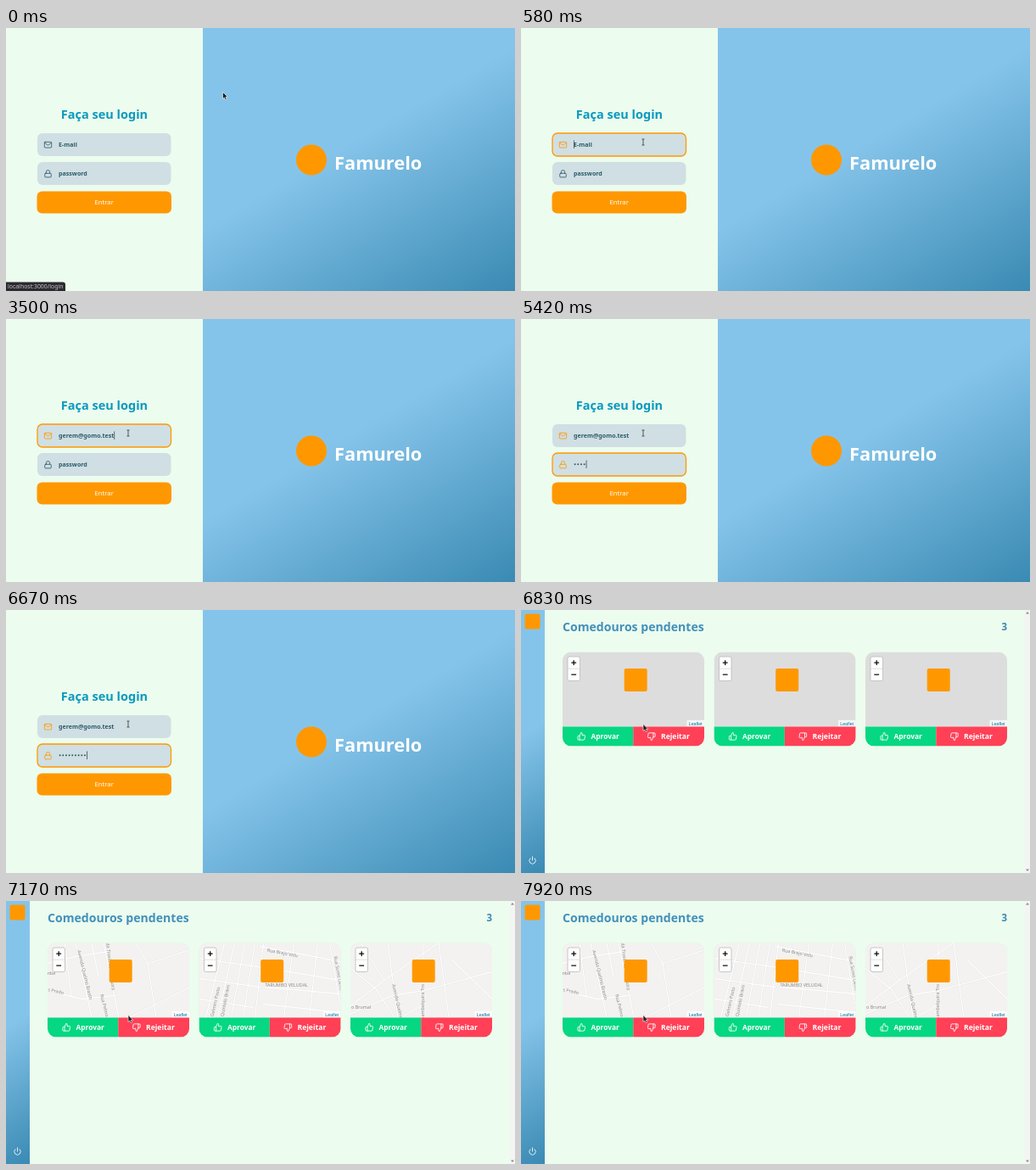
Write an HTML page that moves like this. It is 600 by 310 pixels and loops after 8 s.

```html
<!DOCTYPE html>
<html lang="pt-BR">
<head>
<meta charset="utf-8">
<title>Login</title>
<style>
  html, body { margin: 0; width: 100%; height: 100%; overflow: hidden; background: #ecfcee; }
  .stage { position: relative; width: 600px; height: 310px; overflow: hidden; }
  .blue { position: absolute; top: 0; height: 310px; background: linear-gradient(329.54deg, #3a8ab3 0%, #85c4ea 55%); }
  svg { position: absolute; left: 0; top: 0; font-family: 'Noto Sans', 'Open Sans', sans-serif; }
  .bold { font-weight: 700; }
  .icon { fill: none; stroke-width: 2; stroke-linecap: round; stroke-linejoin: round; }
  .road { fill: none; stroke-linecap: round; }
  .label { font-size: 5.4px; fill: #8b8b8b; }
</style>
</head>
<body>
<div class="stage">
  <div class="blue" id="panel"></div>
  <svg id="scene" width="600" height="310" viewBox="0 0 600 310"></svg>
</div>
<script>
const LOOP = 8000, DASHBOARD_AT = 6830, FOCUS_EMAIL = 580, FOCUS_PASSWORD = 3580;
const EMAIL = 'gerem@gomo.test';
const EMAIL_KEYS = [1080, 1170, 1420, 1580, 1750, 1920, 2170, 2250, 2420, 2750, 2750, 3000, 3080, 3170, 3330];
const PASSWORD_KEYS = [4580, 4920, 5250, 5420, 5580, 5750, 5920, 6170, 6330];
const ORANGE = '#ff9800', INK = '#2b5b6a';

const ICONS = {
  mail: '<rect x="2" y="4" width="20" height="16" rx="2"/><path d="M22 6l-10 7L2 6"/>',
  lock: '<rect x="3" y="11" width="18" height="11" rx="2"/><path d="M7 11V7a5 5 0 0 1 10 0v4"/>',
  power: '<path d="M18.4 6.6a9 9 0 1 1-12.8 0M12 2v10"/>',
  thumb: '<path d="M14 9V5a3 3 0 0 0-3-3l-4 9v11h11.3a2 2 0 0 0 2-1.7l1.4-9a2 2 0 0 0-2-2.3zM7 22H4a2 2 0 0 1-2-2v-7a2 2 0 0 1 2-2h3"/>'
};

const icon = (name, x, y, color, size = 10, turn = 0, id = '') =>
  `<g class="icon" id="${id}" stroke="${color}" transform="translate(${x} ${y}) scale(${size / 24}) rotate(${turn} 12 12)">${ICONS[name]}</g>`;

const text = (string, x, y, size, color, extra = '') =>
  `<text x="${x}" y="${y}" font-size="${size}" fill="${color}" ${extra}>${string}</text>`;

const box = (x, y, w, h, fill, extra = '') =>
  `<rect x="${x}" y="${y}" width="${w}" height="${h}" fill="${fill}" ${extra}/>`;

const field = (id, y, iconName) =>
  box(37, y, 157.5, 27, '#d0dfe3', `rx="6" id="${id}Box" stroke-width="1.3"`) +
  icon(iconName, 44.5, y + 8.7, INK, 10, 0, id + 'Icon') +
  text('', 62, y + 16.2, 7.1, INK, `class="bold" id="${id}Text"`);

const loginPage =
  text('Faça seu login', 116, 107, 14.5, '#0c99c0', 'class="bold" text-anchor="middle"') +
  field('email', 124, 'mail') + field('password', 158, 'lock') +
  '<g id="dots"></g>' + box(62, 133, .7, 9.5, '#333', 'id="caret"') +
  box(36.5, 192.5, 158.5, 26, ORANGE, 'rx="6"') +
  text('Entrar', 115.7, 208.2, 7.7, '#fff', 'text-anchor="middle"') +
  `<circle cx="360" cy="155.5" r="18" fill="${ORANGE}"/>` +
  text('Famurelo', 387, 167, 21.8, '#fff', 'class="bold"') +
  '<g id="status"><path d="M0 299.5H67a3 3 0 0 1 3 3V310H0Z" fill="#2b2a2f"/>' +
  text('localhost:3000/login', 2, 307.3, 6.9, '#c4c6c8') + '</g>';

// Roads and [name, x, y, angle] labels, relative to each card's map
const MAPS = [
  {
    roads: 'M33 0L52 88M66 0L76 48L84 88M52 0L60 40M0 24L33 16L72 10M0 56L40 66L78 62M20 0L28 62M96 88L167 52M104 0L118 24L167 8M118 24L128 88',
    labels: [['Avenida Quelmo Brasto', 35, 9, 76], ['da Trovia Sambelquira', 69, 0, 83], ['Rua Pelmo Zas', 62, 61, 76],
             ['os Prado', -3, 56, 12], ['mbe', -2, 37, 0]]
  },
  {
    roads: 'M8 88L30 0M22 88L42 0M38 88L54 0M52 88L66 0M66 88L76 0M0 18L70 28L167 44M0 42L72 52M0 66L64 76M72 4L167 22M78 52L167 60M100 88L112 0M130 88L140 0M154 0L166 72M76 72L167 82',
    labels: [['Rua Brejo Velu', 80, 10, 11], ['Rua Sumo Delva', 159, 16, 80], ['TARUMBO VELUDAL', 78, 51.5, 0],
             ['Gelmiro Pasto', 17, 87, -77], ['Quintelo Bravo', 29, 87, -79]]
  },
  {
    roads: 'M0 74L40 44L92 8L104 0M0 30L30 54L52 88M44 0L56 88M86 0L86 88M0 84L50 62L86 56L167 34M104 0L116 88M120 20L167 66M12 0L40 44M60 88L86 72',
    labels: [['Avenida Quelmo Brasto', 49, 49, 77], ['Sambelquira Tro', 87, 90, -90], ['o Brumal', 1, 77.5, 0]]
  }
];

function card({ roads, labels }, index) {
  const names = labels.map(([name, x, y, angle]) =>
    `<text class="label" transform="translate(${x} ${y}) rotate(${angle})">${name}</text>`).join('');
  return `<g transform="translate(${49 + index * 178.5} 49.5)"><g clip-path="url(#cardClip)">
    ${box(0, 0, 167, 88, '#dddddd')}
    <g class="tiles" clip-path="url(#mapClip)">${box(0, 0, 167, 88, '#f3f2f1')}
      <path class="road" d="${roads}" stroke="#e2e2e2" stroke-width="2"/>
      <path class="road" d="${roads}" stroke="#fff" stroke-width="1.3"/>${names}</g>
    ${box(72.7, 19.5, 27, 27, ORANGE, 'rx="2"')}
    ${box(6, 5.5, 14.5, 28.5, '#fff', 'rx="2" stroke="#b9b9b9" stroke-width=".8"')}
    <path d="M6 19.7H20.5" stroke="#ccc" stroke-width=".6"/>
    <path d="M10.3 12.7H16.1M13.2 9.8V15.6M10.3 26.7H16.1" stroke="#111" stroke-width="1.3"/>
    ${box(146.5, 80.3, 20.5, 7.7, '#fff', 'fill-opacity=".75"')}
    ${text('Leaflet', 148.7, 86, 5.3, '#0078a8', 'font-family="Liberation Sans, Arial, sans-serif"')}
    ${box(0, 88, 83.3, 23, '#05d782')}${box(83.3, 88, 84, 23, '#ff4056')}
    ${icon('thumb', 17, 94, '#fff', 10.5)}${text('Aprovar', 33.5, 102.8, 8.4, '#fff', 'class="bold"')}
    ${icon('thumb', 99.5, 94.5, '#fff', 10.5, 180)}${text('Rejeitar', 116, 102.8, 8.6, '#fff', 'class="bold"')}
  </g></g>`;
}

const dashboard =
  box(4.5, 4.5, 18, 18, ORANGE, 'rx="2"') + icon('power', 8.5, 290, '#fff', 10) +
  text('Comedouros pendentes', 49, 25, 14.1, '#4290bc', 'class="bold"') +
  text('3', 573, 24, 11.5, '#3b88b4', 'class="bold" text-anchor="end"') +
  MAPS.map(card).join('') +
  box(593.5, 0, 6.5, 310, '#f3f5f3') +
  '<path d="M595 4.5L597 2L599 4.5ZM595 305.5L597 308L599 305.5Z" fill="#8a8a8a"/>';

const $ = id => document.getElementById(id);
$('scene').innerHTML = `<defs>
    <clipPath id="cardClip"><rect width="167" height="111" rx="10"/></clipPath>
    <clipPath id="mapClip"><rect width="167" height="88"/></clipPath>
  </defs>
  <g id="login">${loginPage}</g><g id="dashboard">${dashboard}</g>
  <g id="pointer">
    <path id="arrow" d="M0 0V8L1.9 6.4L3.2 9.1L4.6 8.4L3.4 5.8H5.8Z" fill="#1c1c1c" stroke="#fff" stroke-width=".6"/>
    <path id="beam" d="M-1.5 -3.5H1.5M0 -3.5V3.5M-1.5 3.5H1.5" fill="none" stroke="#333" stroke-width=".8"/>
  </g>`;
const tiles = document.querySelectorAll('.tiles');

const show = (element, visible) => element.setAttribute('display', visible ? 'inline' : 'none');
const clamp = value => Math.max(0, Math.min(1, value));
const pressed = (keys, t) => keys.filter(time => time <= t).length;

function paintField(id, focused, filled) {
  $(id + 'Box').setAttribute('stroke', focused ? ORANGE : 'none');
  $(id + 'Icon').setAttribute('stroke', focused || filled ? ORANGE : INK);
}

function drawLogin(t) {
  const letters = pressed(EMAIL_KEYS, t), dots = pressed(PASSWORD_KEYS, t);
  const onPassword = t >= FOCUS_PASSWORD, onEmail = t >= FOCUS_EMAIL && !onPassword;
  show($('status'), t < 420);
  $('emailText').textContent = letters ? EMAIL.slice(0, letters) : 'E-mail';
  $('passwordText').textContent = dots ? '' : 'password';
  $('dots').innerHTML = Array.from({ length: dots }, (_, i) =>
    `<circle cx="${63.6 + i * 3.67}" cy="171.3" r="1" fill="${INK}"/>`).join('');
  paintField('email', onEmail, letters > 0);
  paintField('password', onPassword, dots > 0);
  const typed = onPassword ? dots * 3.67 : letters && $('emailText').getComputedTextLength();
  $('caret').setAttribute('x', 62 + typed);
  $('caret').setAttribute('y', onPassword ? 166.5 : 132.5);
  show($('caret'), onEmail || onPassword);
}

function drawPointer(t) {
  const p = clamp((t - 80) / 500), eased = p * p * (3 - 2 * p);
  const x = 255.5 - 111.5 * eased, y = 75.5 + 59 * eased;
  const overField = t < DASHBOARD_AT && x < 195 && y > 124;
  $('pointer').setAttribute('transform', `translate(${x} ${y})`);
  show($('arrow'), !overField);
  show($('beam'), overField);
}

function draw(t) {
  const inside = t >= DASHBOARD_AT;
  show($('login'), !inside);
  show($('dashboard'), inside);
  $('panel').style.left = inside ? '0' : '231.5px';
  $('panel').style.width = inside ? '27.5px' : '368.5px';
  if (inside) tiles.forEach(tile => tile.setAttribute('opacity', clamp((t - DASHBOARD_AT) / 340)));
  else drawLogin(t);
  drawPointer(t);
}

const start = performance.now();
function tick() {
  draw((performance.now() - start) % LOOP);
  requestAnimationFrame(tick);
}
tick();
</script>
</body>
</html>
```
